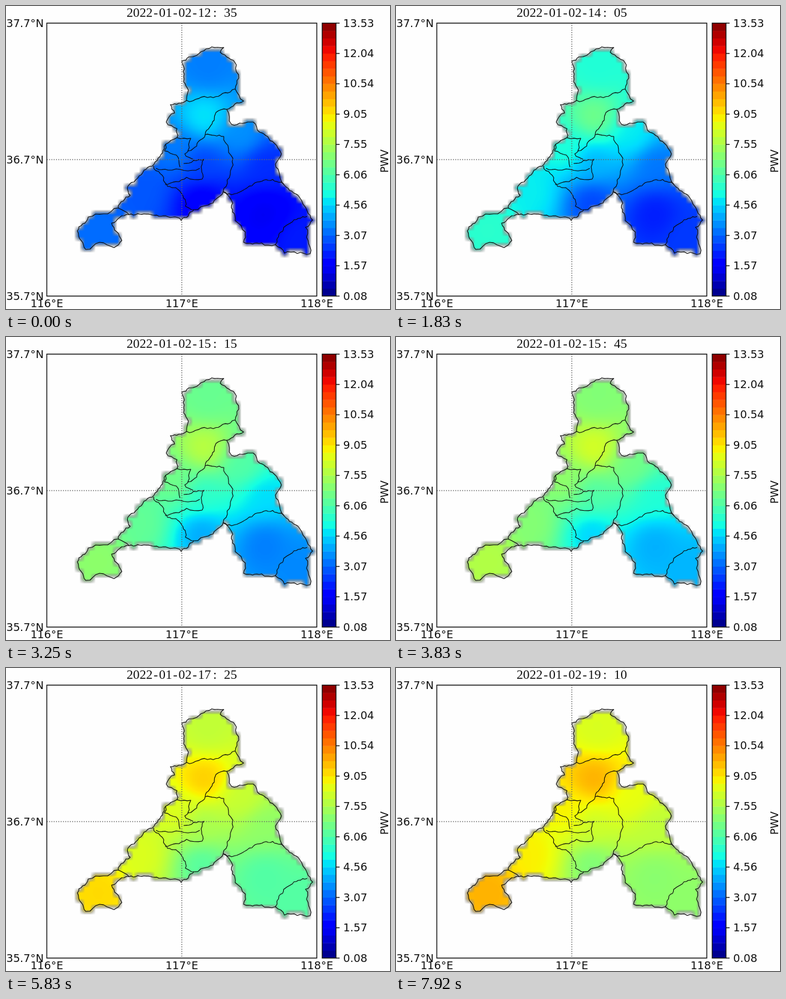
Recreate the animation shown at these times as an HTML page with a canvas. Size 640x504 px, loop 8000 ms.

```html
<!DOCTYPE html>
<html lang="en">
<head>
<meta charset="utf-8">
<title>PWV map</title>
<style>
  html, body { margin: 0; width: 100%; height: 100%; overflow: hidden; background: #fefefe; }
  canvas, svg { position: absolute; left: 0; top: 0; width: 640px; height: 504px; }
  text { font: 18px "DejaVu Sans", sans-serif; fill: #111; }
  #title { font: 21.6px "Liberation Serif", serif; text-anchor: middle; }
  .mid { text-anchor: middle; }
  .end { text-anchor: end; }
  .line { fill: none; stroke: #0a0a0a; stroke-width: 1.1; stroke-linejoin: round; }
  .frame { fill: none; stroke: #111; stroke-width: 1.4; }
  .grid { fill: none; stroke: #666; stroke-width: 1.5; stroke-dasharray: 1.5 2.35; }
</style>
</head>
<body>
<canvas id="map" width="640" height="504"></canvas>
<svg id="overlay" viewBox="0 0 640 504">
  <text id="title" y="18"></text>
  <g id="bar"></g>
  <g id="borders"></g>
  <path class="grid" d="M293 28V482M68 255.5H518"/>
  <path class="frame" d="M68 28.5H518V482.5H68ZM527 28.5H550V482.5H527Z"/>
  <g id="labels"></g>
  <text class="mid" transform="translate(636.5 258) rotate(-90)" style="font-size:17px">PWV</text>
</svg>
<script>
const LOOP = 8000, FPS = 12, STEP = 100, LAST_STEP = 79;
const LOW = 0.08, HIGH = 13.53;
const $ = id => document.getElementById(id);
const clamp = v => Math.max(0, Math.min(1, v));

// Corner points; the small bends between them are random
const coast = `293,92 318,82 325,76 343,68 363,69 357,77 384,98 388,120 382,138 396,158 368,172 376,197
  412,193 423,210 447,228 459,246 449,263 464,298 489,318 502,341 511,356 499,368 507,412 464,411
  449,397 426,394 396,393 399,376 382,357 378,328 362,309 337,331 313,339 292,357 262,349 205,347
  176,361 193,390 180,402 156,393 133,405 119,374 137,351 187,336 207,315 203,300 228,277 252,257
  266,230 285,219 285,204 267,193 281,178 274,164 301,157 304,140 296,126 293,92`;
const districts = [
  '301,157 341,151 374,143 382,138',
  '368,172 350,177 347,190 332,214',
  '332,214 363,217 377,259 367,300 362,309',
  '332,214 311,238 298,246 312,255',
  '285,219 308,220 303,241',
  '266,230 264,241 284,248 290,268',
  '250,270 270,273 323,270',
  '296,262 330,255 326,272 327,288',
  '246,266 265,294 289,307 299,333 313,339',
  '265,297 301,285 327,288',
  '362,309 376,314 410,299 437,290 464,298',
  '449,397 455,379 474,361 502,350',
  '187,336 205,347'
];

let seed = 7;
const random = () => (seed = seed * 16807 % 2147483647) / 2147483647;

function bend([ax, ay], [bx, by]) {
  const dx = bx - ax, dy = by - ay, length = Math.hypot(dx, dy);
  if (length < 7) return `L${bx.toFixed(1)} ${by.toFixed(1)}`;
  const shift = (random() - 0.5) * Math.min(0.4, 5 / length);
  const middle = [ax + dx / 2 - dy * shift, ay + dy / 2 + dx * shift];
  return bend([ax, ay], middle) + bend(middle, [bx, by]);
}

function ragged(list) {
  const points = list.split(/\s+/).map(p => p.split(',').map(Number));
  return 'M' + points[0] + points.slice(1).map((p, i) => bend(points[i], p)).join('');
}

function add(parent, tag, attrs, text = '') {
  const node = document.createElementNS('http://www.w3.org/2000/svg', tag);
  for (const key in attrs) node.setAttribute(key, attrs[key]);
  node.textContent = text;
  $(parent).append(node);
}

// Rises from 0 to 1 between a and b, falls back to 0 between c and d
const hill = (v, a, b, c, d) => 255 * clamp(Math.min((v - a) / (b - a), (d - v) / (d - c)));
const jet = v => [
  hill(v, 0.35, 0.66, 0.89, 1.11),
  hill(v, 0.125, 0.375, 0.64, 0.91),
  hill(v, -0.11, 0.11, 0.34, 0.65)
].map(Math.round);

const outline = ragged(coast) + 'Z';
[outline, ...districts.map(ragged)].forEach(d => add('borders', 'path', { class: 'line', d }));

const BANDS = 36, bandHeight = 454 / BANDS;
for (let i = 0; i < BANDS; i++) {
  add('bar', 'rect', {
    x: 527, y: 482.5 - (i + 1) * bandHeight, width: 23, height: bandHeight + 0.4,
    fill: `rgb(${jet((i + 0.5) / BANDS)})`
  });
}
for (let i = 0; i < 10; i++) {
  const y = 482.5 - i * 454 / 9;
  add('labels', 'path', { class: 'frame', d: `M550 ${y}h6` });
  add('labels', 'text', { x: 562, y: y + 6 }, (LOW + i * (HIGH - LOW) / 9).toFixed(2));
}
for (let i = 0; i < 3; i++) {
  add('labels', 'text', { class: 'mid', x: 68 + 225 * i, y: 501 }, `${116 + i}°E`);
  add('labels', 'text', { class: 'end', x: 63, y: 34.5 + 227 * i }, `${(37.7 - i).toFixed(1)}°N`);
}

// Stations: x, y, first value, last value
const stations = [
  [335, 105, 3.4, 8.3],
  [330, 185, 4.9, 9.9],
  [158, 370, 3.2, 9.8],
  [225, 310, 2.9, 8.9],
  [285, 240, 3.4, 8.9],
  [325, 262, 2.6, 8.1],
  [325, 325, 1.5, 6.8],
  [395, 215, 3.7, 8.6],
  [430, 262, 2.3, 7.9],
  [430, 345, 1.4, 7.0],
  [485, 385, 2.1, 7.1]
];

// The rise starts later the further south-east a station lies
function stationValue([x, y, first, last], step) {
  const lag = 0.9 + Math.max(0, x + y - 500) / 250;
  return first + (last - first) * Math.sin(step / LAST_STEP * Math.PI / 2) ** lag;
}

// Coarse grid, blown up with bilinear interpolation
const CELL = 9, LEFT = 104, TOP = 50, COLS = 47, ROWS = 43;
const WIDTH = (COLS - 1) * CELL, HEIGHT = (ROWS - 1) * CELL;
const ctx = $('map').getContext('2d');
const shape = new Path2D(outline);

const cells = Array.from({ length: COLS * ROWS }, (_, i) => {
  const x = LEFT + i % COLS * CELL, y = TOP + Math.floor(i / COLS) * CELL;
  const raw = stations.map(([sx, sy]) => ((x - sx) ** 2 + (y - sy) ** 2 + 700) ** -1.7);
  const sum = raw.reduce((a, b) => a + b);
  return {
    weights: raw.map(w => w / sum),
    inside: Number(ctx.isPointInPath(shape, x, y))
  };
});

function sample(grid, x, y) {
  const fx = x % CELL / CELL, fy = y % CELL / CELL;
  const i = Math.floor(y / CELL) * COLS + Math.floor(x / CELL);
  const upper = grid[i] + (grid[i + 1] - grid[i]) * fx;
  const lower = grid[i + COLS] + (grid[i + COLS + 1] - grid[i + COLS]) * fx;
  return upper + (lower - upper) * fy;
}

const insideGrid = cells.map(c => c.inside);
const cover = Float32Array.from({ length: WIDTH * HEIGHT },
  (_, i) => sample(insideGrid, i % WIDTH, Math.floor(i / WIDTH)));
const palette = Array.from({ length: 512 }, (_, i) => jet(i / 511));
const image = ctx.createImageData(WIDTH, HEIGHT);

function drawField(step) {
  const values = stations.map(s => stationValue(s, step));
  const grid = cells.map(c => c.weights.reduce((sum, w, i) => sum + w * values[i], 0));
  for (let i = 0; i < cover.length; i++) {
    const t = cover[i];
    if (!t) continue;
    const v = (sample(grid, i % WIDTH, Math.floor(i / WIDTH)) - LOW) / (HIGH - LOW);
    const color = palette[Math.round(clamp(v) * 511)];
    // Fading towards transparent black leaves a dark rim
    for (let c = 0; c < 3; c++) image.data[i * 4 + c] = color[c] * t;
    image.data[i * 4 + 3] = 255 * t;
  }
  ctx.putImageData(image, LEFT, TOP);
}

// Half-width cells, with a full-width colon after the hour
const charWidth = 10.82;
const titleX = Array.from({ length: 16 }, (_, i) =>
  201 + charWidth * (i < 13 ? i + 0.5 : i === 13 ? 13.6 : i + 1.5));
$('title').setAttribute('x', titleX.join(' '));

function drawTitle(step) {
  const minutes = 12 * 60 + 35 + step * 5;
  const pad = n => String(n).padStart(2, '0');
  $('title').textContent = `2022-01-02-${pad(Math.floor(minutes / 60))}:${pad(minutes % 60)}`;
}

let shown = -1;
function tick() {
  const time = performance.now() % LOOP;
  const frame = Math.min(95, Math.floor((time + 5) * FPS / 1000));
  const step = Math.floor(frame * 1000 / FPS / STEP + 1e-6);
  if (step !== shown) {
    shown = step;
    drawField(step);
    drawTitle(step);
  }
  requestAnimationFrame(tick);
}
tick();
</script>
</body>
</html>
```
